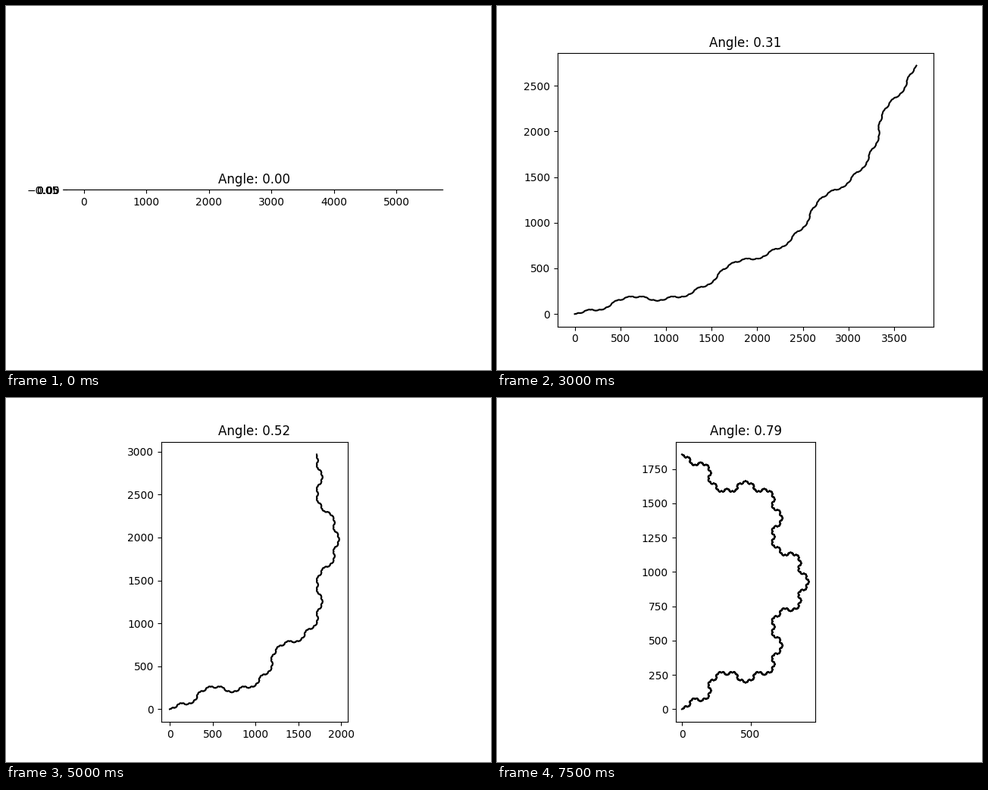
Animation of 640 by 480 pixels, one loop 8 s. Source, as a matplotlib script:

```python
import numpy as np
import matplotlib.pyplot as plt
from matplotlib.animation import FuncAnimation

FRAMES = 16
INTERVAL = 500
STEP = np.pi / 60
LEVELS = 6
TURNS = np.array([0, -1, 1, 0])


def heading_counts():
    """Heading of every segment, in multiples of the fold angle."""
    h = np.zeros(1)
    for _ in range(LEVELS):
        h = np.add.outer(h, TURNS).ravel()
    return np.concatenate([h + 1, h + 3])


HEADINGS = heading_counts()


def curve(angle):
    length = 2 / (1 + 2 * np.cos(angle))
    steps = length * np.exp(1j * angle * HEADINGS)
    z = np.concatenate([[0], np.cumsum(steps)])
    return z.real, z.imag


fig, ax = plt.subplots(figsize=(6.4, 4.8), dpi=100)


def draw(i):
    angle = i * STEP
    ax.clear()
    ax.set_aspect("equal")
    ax.plot(*curve(angle), color="black")
    ax.set_title(f"Angle: {angle:.2f}")
    return ax.lines


anim = FuncAnimation(fig, draw, frames=FRAMES, init_func=lambda: [],
                     interval=INTERVAL, repeat=True, repeat_delay=0)
plt.show()
```
